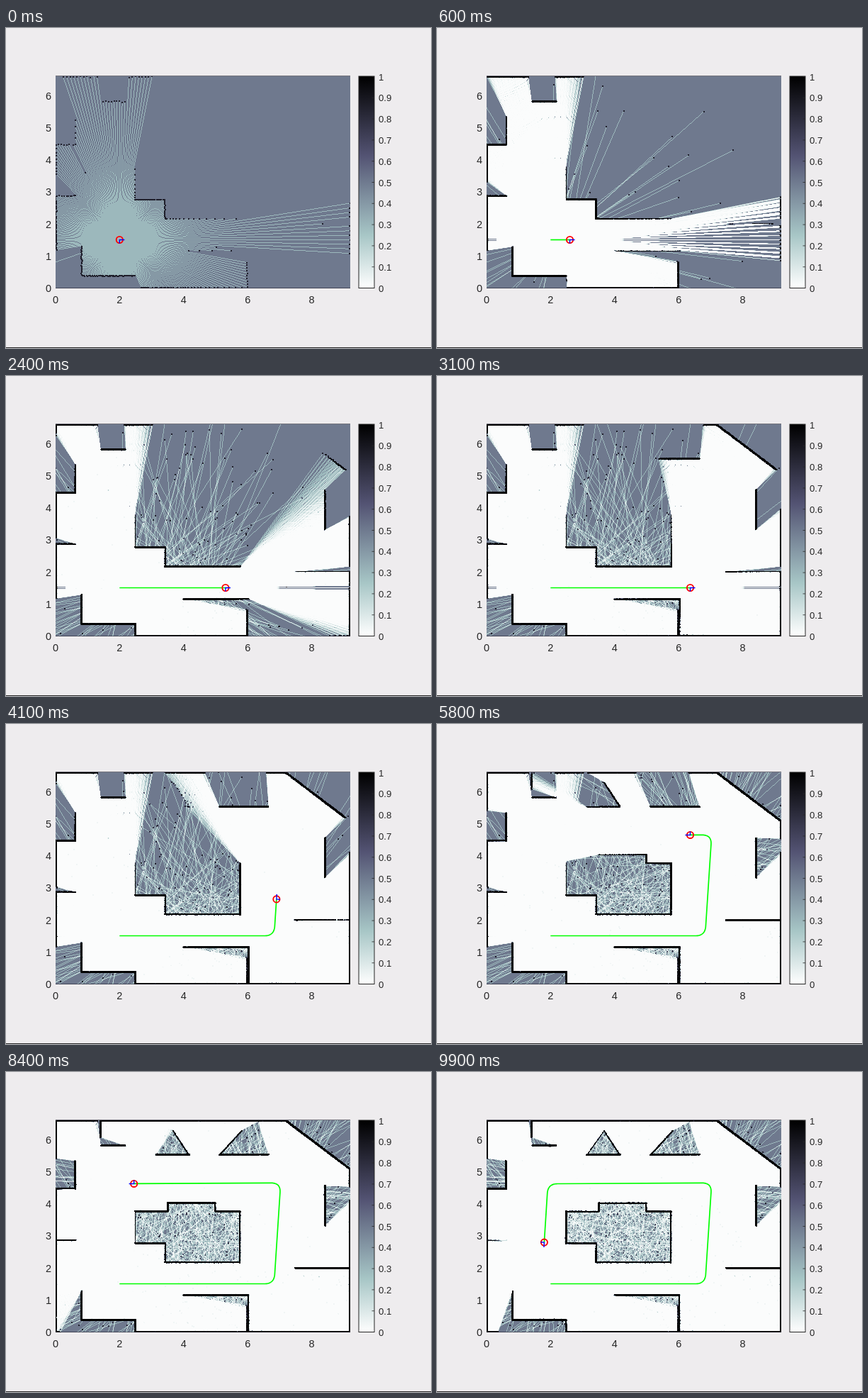
These frames come from a looping animation (600 px wide and 451 px high, 10 s). An HTML page with a canvas:

```html
<!DOCTYPE html>
<html lang="en">
<head>
<meta charset="utf-8">
<title>Occupancy map</title>
<style>
html, body { margin: 0; width: 100%; height: 100%; overflow: hidden; background: #eeecee; }
canvas { display: block; }
</style>
</head>
<body>
<canvas id="stage" width="600" height="451"></canvas>
<script>
const ctx = document.getElementById('stage').getContext('2d');

// Map area in stage pixels
const X0 = 70, Y0 = 68, W = 416, H = 299, UNIT = 45.2;
const STEPS = 100, STEP_MS = 100, SCANS_PER_STEP = 6;
const SPEED = 6.8, IDLE_STEPS = 2;
const BEAMS = 320, MAX_RANGE = 360, STRAY_RATE = 0.012, STRAY_RANGE = 280;
const HIT = 1.8, MISS = -0.85, LIMIT = 5;
const INK = '#262626';

const clamp = (v, lo, hi) => Math.max(lo, Math.min(hi, v));

// Walls: start point and extent
const walls = [];
function wall(x1, y1, x2, y2) {
  walls.push([x1, y1, x2 - x1, y2 - y1]);
}
// Moves alternate between horizontal and vertical
function steps(x, y, ...moves) {
  moves.forEach((m, i) => {
    const nx = i % 2 ? x : x + m, ny = i % 2 ? y + m : y;
    if (m) wall(x, y, nx, ny);
    x = nx;
    y = ny;
  });
}
function tent(left, right, base, peakX, peakY) {
  wall(left, base, right, base);
  wall(left, base, peakX, peakY);
  wall(right, base, peakX, peakY);
}
steps(71, 69, 414, 297, -414, -297);
steps(71, 165, 27, -40);
steps(71, 237, 28);
steps(183, 366, 0, -17, -76, -41);
steps(250, 314, 93, 52);
steps(340.5, 314, 0, 52);
steps(182, 196, 46, -12, 68, 12, 35, 73, -107, -27, -42, -46);
steps(407, 276, 78);
steps(450, 217, 0, -57);
steps(134, 69, 0, 35, 35);
wall(395, 69, 485, 137);
tent(211, 259, 117, 236, 82);
tent(301, 371, 117, 333, 82);

// Route of the robot: corner points, rounded off
const corners = [[160.3, 298.5], [378.5, 298.5], [387.8, 156.3], [156.6, 157.6], [151, 246]];
const ROUNDING = 13.5;
const route = [];

function addPoint(x, y) {
  const last = route[route.length - 1];
  const s = last ? last.s + Math.hypot(x - last.x, y - last.y) : 0;
  route.push({ x, y, s });
}
function toward([x1, y1], [x2, y2]) {
  const f = ROUNDING / Math.hypot(x2 - x1, y2 - y1);
  return [x1 + (x2 - x1) * f, y1 + (y2 - y1) * f];
}
corners.forEach((c, i) => {
  const before = corners[i - 1], after = corners[i + 1];
  if (!before || !after) return addPoint(...c);
  const a = toward(c, before), b = toward(c, after);
  for (let t = 0; t <= 1; t += 1 / 16) {
    const u = 1 - t;
    const blend = j => u * u * a[j] + 2 * u * t * c[j] + t * t * b[j];
    addPoint(blend(0), blend(1));
  }
});

function poseAt(step) {
  const d = Math.max(0, step - IDLE_STEPS) * SPEED;
  let i = 1;
  while (i < route.length - 1 && route[i].s < d) i++;
  const a = route[i - 1], b = route[i];
  const t = Math.min(1, (d - a.s) / (b.s - a.s));
  return {
    x: a.x + (b.x - a.x) * t,
    y: a.y + (b.y - a.y) * t,
    heading: Math.atan2(b.y - a.y, b.x - a.x),
    next: i
  };
}

function seeded(seed) {
  let a = seed * 7919 + 17;
  return () => {
    a = (a + 0x6D2B79F5) | 0;
    let t = Math.imul(a ^ (a >>> 15), 1 | a);
    t = (t + Math.imul(t ^ (t >>> 7), 61 | t)) ^ t;
    return ((t ^ (t >>> 14)) >>> 0) / 4294967296;
  };
}

function castRay(x, y, dx, dy) {
  let best = Infinity;
  for (const [wx, wy, ex, ey] of walls) {
    const det = dx * ey - dy * ex;
    if (Math.abs(det) < 1e-9) continue;
    const qx = wx - x, qy = wy - y;
    const r = (qx * ey - qy * ex) / det;
    const u = (qx * dy - qy * dx) / det;
    if (r > 0 && r < best && u > -1e-6 && u < 1 + 1e-6) best = r;
  }
  return best;
}

// Log-odds grid; a cell changes at most once per scan
const odds = new Float32Array(W * H);
const stamp = new Int16Array(W * H);
let scanned = -1;

function mark(x, y, amount, id) {
  const cx = Math.floor(x - X0), cy = Math.floor(y - Y0);
  if (cx < 0 || cy < 0 || cx >= W || cy >= H) return false;
  const i = cy * W + cx;
  if (stamp[i] !== id) {
    stamp[i] = id;
    odds[i] = clamp(odds[i] + amount, -LIMIT, LIMIT);
  }
  return true;
}

function scan(n) {
  const rnd = seeded(n + 1), pose = poseAt(n / SCANS_PER_STEP), id = n + 1;
  const beams = [];
  for (let i = 0; i < BEAMS; i++) {
    const angle = pose.heading + i * 2 * Math.PI / BEAMS;
    const dx = Math.cos(angle), dy = Math.sin(angle);
    const range = rnd() < STRAY_RATE
      ? rnd() * STRAY_RANGE
      : castRay(pose.x, pose.y, dx, dy) + rnd() * 1.6 - 0.6;
    beams.push({ dx, dy, range });
  }
  // An echo fills the four cells around its end
  for (const b of beams) {
    if (b.range > MAX_RANGE) continue;
    const x = pose.x + b.dx * b.range, y = pose.y + b.dy * b.range;
    for (const ox of [-0.5, 0.5]) {
      for (const oy of [-0.5, 0.5]) mark(x + ox, y + oy, HIT, id);
    }
  }
  for (const b of beams) {
    const end = Math.min(b.range, MAX_RANGE);
    const step = 1 / Math.max(Math.abs(b.dx), Math.abs(b.dy));
    for (let r = 0; r < end; r += step) {
      if (!mark(pose.x + b.dx * r, pose.y + b.dy * r, MISS, id)) break;
    }
  }
}

function scanTo(n) {
  if (n < scanned) {
    odds.fill(0);
    stamp.fill(0);
    scanned = -1;
  }
  while (scanned < n) scan(++scanned);
}

// Bluish grey scale, 0 = white, 1 = black
function shade(p) {
  const g = 1 - p;
  const tint = [(g - 0.75) / 0.25, (g - 0.375) / 0.375, g / 0.375];
  return tint.map(v => Math.round(254 * (7 * g + clamp(v, 0, 1)) / 8));
}
const shades = Array.from({ length: 256 }, (_, i) => shade(i / 255));

const image = ctx.createImageData(W, H);
function paintMap() {
  const px = image.data;
  for (let i = 0; i < odds.length; i++) {
    px.set(shades[Math.round(255 / (1 + Math.exp(-odds[i])))], i * 4);
    px[i * 4 + 3] = 255;
  }
  ctx.putImageData(image, X0, Y0);
}

function line(points, color, width) {
  ctx.beginPath();
  points.forEach(p => ctx.lineTo(p[0], p[1]));
  ctx.strokeStyle = color;
  ctx.lineWidth = width;
  ctx.stroke();
}

function label(text, x, y, align, size) {
  ctx.font = size + 'px "Liberation Sans", Arial, sans-serif';
  ctx.textAlign = align;
  ctx.fillText(text, x, y);
}

function paintAxes() {
  ctx.fillStyle = '#eeecee';
  ctx.fillRect(0, 0, 600, 451);
  ctx.fillStyle = INK;
  ctx.fillRect(0, 450, 600, 1);

  for (let v = 0; v <= 8; v += 2) label(v, X0 + v * UNIT, 387.5, 'center', 14.5);
  for (let v = 0; v <= 6; v++) label(v, 64, 372 - v * UNIT, 'right', 14.5);

  const bar = ctx.createLinearGradient(0, 366, 0, 68);
  for (let i = 0; i <= 8; i++) bar.addColorStop(i / 8, `rgb(${shade(i / 8)})`);
  ctx.fillStyle = bar;
  ctx.fillRect(498, 68, 22, 299);
  ctx.strokeStyle = INK;
  ctx.lineWidth = 1;
  ctx.strokeRect(498, 68, 22, 298.5);
  ctx.fillStyle = INK;
  for (let i = 0; i <= 10; i++) {
    const y = 366.5 - i * 29.8;
    line([[516.5, y], [520, y]], INK, 0.8);
    label(i / 10, 526, y + 5, 'left', 13.2);
  }
}

function paintRobot(pose) {
  const trail = route.slice(0, pose.next).map(p => [p.x, p.y]);
  trail.push([pose.x, pose.y]);
  line(trail, '#00ff00', 1.7);

  ctx.beginPath();
  ctx.arc(pose.x, pose.y, 4.6, 0, 2 * Math.PI);
  ctx.strokeStyle = '#ff0000';
  ctx.lineWidth = 1.9;
  ctx.stroke();

  ctx.save();
  ctx.translate(pose.x, pose.y);
  ctx.rotate(pose.heading);
  line([[7, 0], [0, 0], [0, 5]], '#0000ff', 1.4);
  ctx.restore();
}

function draw(step) {
  scanTo(step * SCANS_PER_STEP);
  paintAxes();
  paintMap();
  for (const y of [67.5, 366.5]) line([[X0, y], [X0 + W, y]], 'rgba(38,38,50,0.6)', 1);
  paintRobot(poseAt(step));
}

const start = performance.now();
let shown = -1;
function tick() {
  const step = Math.floor((performance.now() - start) / STEP_MS) % STEPS;
  if (step !== shown) {
    shown = step;
    draw(step);
  }
  requestAnimationFrame(tick);
}
tick();
</script>
</body>
</html>
```
